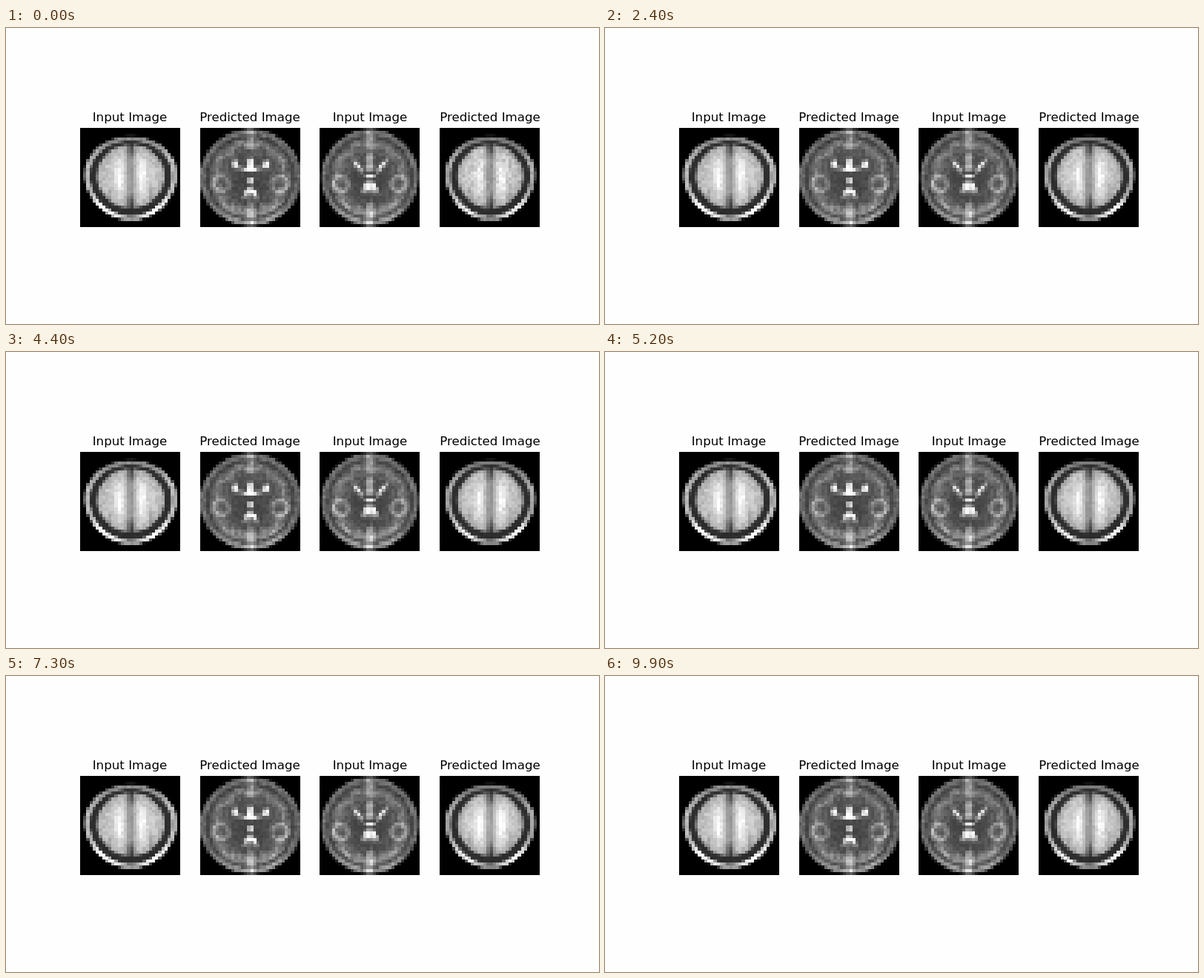
An HTML page with a canvas that plays this animation: 800x400 px, repeating every 10000 ms.

```html
<!DOCTYPE html>
<html lang="en">
<head>
<meta charset="utf-8">
<title>Predicted images</title>
<style>
  html, body { margin: 0; width: 100%; height: 100%; overflow: hidden; background: #fefefe; }
  canvas { position: absolute; top: 135px; width: 135px; height: 134px; image-rendering: pixelated; }
  svg { position: absolute; left: 0; top: 0; }
  text { font: 16.67px "DejaVu Sans", sans-serif; text-anchor: middle; fill: #000; }
</style>
</head>
<body>
<svg width="800" height="400"></svg>
<script>
const N = 32, STEP = 100, STEPS = 100, GAP = 161.74;
const { abs, exp, hypot, min, max, sin, atan2 } = Math;

// Soft shapes, all between 0 and 1
const bump = (d, w) => exp(-((d / w) ** 2));
const blob = (x, y, rx, ry) => exp(-(((x / rx) ** 2 + (y / ry) ** 2) ** 2));
const mix = (a, b, t) => a + (b - a) * t;
function ramp(from, to, v) {
  const t = min(1, max(0, (v - from) / (to - from)));
  return t * t * (3 - 2 * t);
}

// Repeatable noise in -0.5..0.5
function noise(x, y, seed) {
  let h = Math.imul(x + 1, 374761393) ^ Math.imul(y + 1, 668265263) ^ Math.imul(seed + 1, 1274126177);
  h = Math.imul(h ^ (h >>> 13), 1103515245);
  h = Math.imul(h ^ (h >>> 16), 2246822519);
  return ((h ^ (h >>> 15)) >>> 0) / 4294967296 - 0.5;
}

// Bright brain inside a pale, slightly tapered scalp; size scales its width
const upper = (size, pale) => (x, y) => {
  const u = (x - 16.2) / size, v = y - 16.3, side = abs(u);
  const r = hypot(u * (1 + 0.006 * v) / 14.7, v / 13.6);
  const brain = hypot(u / 10.9, (v + 0.7) / 10.3);

  let scalp = pale - 45 * ramp(-6, -12, v);
  scalp += 85 * bump(side - 8, 4) * ramp(4, 8, v) - 40 * bump(u, 2) * ramp(8, 12, v);
  const skull = mix(45, scalp, ramp(0.86, 0.92, r));

  let tissue = 210 - 45 * brain ** 4;
  tissue += 50 * bump(side - 3.6, 1.2) * bump(v + 0.5, 5);
  tissue -= 60 * bump(u, 1.5) + 25 * bump(side - 6.5, 0.8) * bump(v - 5, 3);
  tissue -= 60 * bump(u, 0.8) * (ramp(4, 8, v) + ramp(-6, -9, v));
  return mix(skull, tissue, ramp(1.04, 0.94, brain)) * ramp(1.03, 0.97, r);
};

// Gray tissue with folded cortex; ventricles(u, y) gives the white fluid
const lower = (rx, ventricles) => (x, y) => {
  const u = x - 16.1, v = y - 16, side = abs(u);
  const r = hypot(u / rx, v / 15.4), folds = sin(9 * atan2(v, side));

  let g = 92 - 22 * blob(u, v - 1, 7, 8);
  g += 32 * bump(r - 0.7 - 0.04 * folds, 0.07) + 40 * bump(r - 0.78, 0.07) * ramp(4, 9, v);
  g += 50 * bump(hypot(side - 9.3, y - 18) - 2.3, 0.8);
  g -= 30 * bump(r - 0.86, 0.04);
  g += (20 + 45 * ramp(8, 13, v)) * bump(r - 0.94, 0.06);
  g += 65 * bump(u, 1.2) * (ramp(-8, -11, v) + ramp(7, 9, v));
  g -= 22 * bump(side - 2.2, 0.7) * ramp(7, 9, v);
  return mix(g, 250, min(1, ventricles(u, y))) * ramp(1.04, 0.98, r);
};

// Lower white body: widens downward from top, with a notch between its feet
function body(u, y, top, width, notch) {
  const inside = ramp(0.5, -0.4, abs(u) - width - 0.5 * (y - top));
  return inside * bump(y - top - 1.5, 1.7) * (1 - notch * blob(u, y - top - 3, 0.8, 0.8));
}

const predictedFluid = (u, y) =>
  blob(abs(u) - 4.9, y - 11.8, 0.9, 1.4) +
  blob(u, y - 11.8, 1, 2.3) + blob(u, y - 13.3, 2.2, 0.8) +
  0.4 * blob(abs(u) - 3.2, y - 13, 1.4, 0.6) +
  0.9 * blob(u, y - 17, 1, 0.9) + body(u, y, 19.1, 0.9, 0.8);

const inputFluid = (u, y) => {
  const side = abs(u), arm = 13.6 - 1.1 * (side - 2.7);
  return bump(y - arm, 0.9) * blob(side - 3.9, 0, 1.5, 1) +
    0.5 * blob(u, y - 10.3, 1.2, 2.6) + 0.6 * blob(u, y - 13, 1.8, 0.7) +
    0.9 * blob(u, y - 15.5, 1.6, 0.8) + body(u, y, 17.4, 1.3, 0.3);
};

function makePanel(i, shade, seed, grain) {
  const canvas = document.createElement('canvas');
  canvas.width = canvas.height = N;
  canvas.style.left = Math.round(100 + i * GAP) + 'px';
  document.body.append(canvas);

  const title = document.createElementNS('http://www.w3.org/2000/svg', 'text');
  title.setAttribute('x', Math.round(167.4 + i * GAP));
  title.setAttribute('y', 126);
  title.textContent = i % 2 ? 'Predicted Image' : 'Input Image';
  document.querySelector('svg').append(title);

  const c = canvas.getContext('2d'), out = c.createImageData(N, N);
  return (k = 0, live = 0, gain = 1) => {
    for (let y = 0; y < N; y++) for (let x = 0; x < N; x++) {
      const at = (y * N + x) * 4;
      const far = min(1, hypot(x - 15.7, y - 15.5) / 9);
      const change = grain * mix(0.4, 1, far) * noise(x, y, seed) + live * noise(x, y, seed + k + 1);
      const value = shade(x + 0.5, y + 0.5) * (mix(gain, 1, far) + change);
      out.data.fill(value, at, at + 3);
      out.data[at + 3] = 255;
    }
    c.putImageData(out, 0, 0);
  };
}

makePanel(0, upper(1, 185), 3, 0.16)();
makePanel(2, lower(15.4, inputFluid), 11, 0.32)();
const paintLower = makePanel(1, lower(16.1, predictedFluid), 200, 0.3);
const paintUpper = makePanel(3, upper(0.97, 165), 400, 0.14);

let shown = -1;
function tick() {
  const k = Math.floor(performance.now() / STEP) % STEPS;
  if (k !== shown) {
    shown = k;
    const live = 0.05 + 0.1 * exp(-k / 14);
    paintLower(k, live);
    paintUpper(k, live, 0.96 + 0.13 * bump(k - 81, 14));
  }
  requestAnimationFrame(tick);
}
tick();
</script>
</body>
</html>
```
